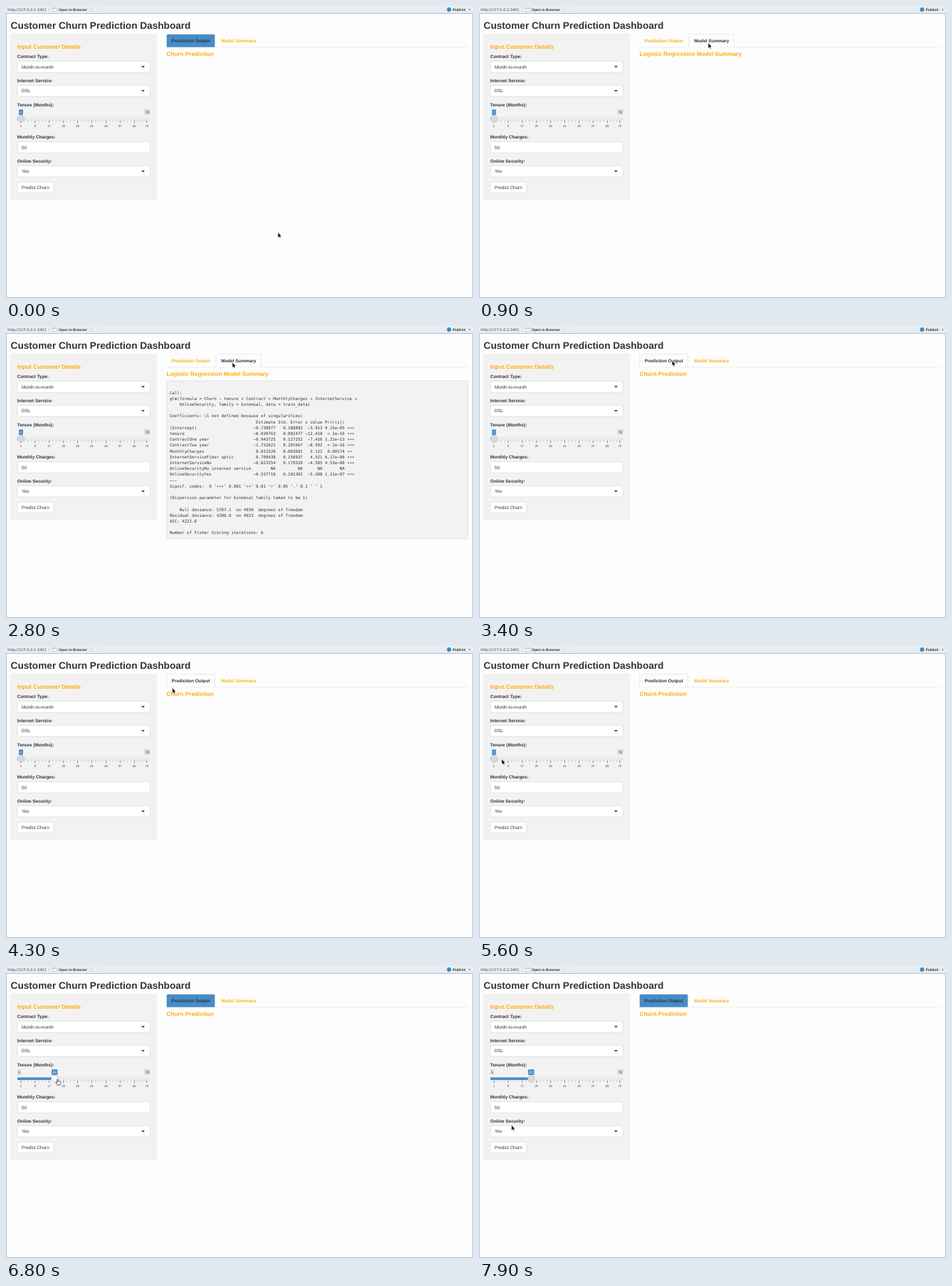
Animation of 656x410 px, one loop 8 s. Source, as an HTML page:

```html
<!DOCTYPE html>
<html lang="en">
<head>
<meta charset="utf-8">
<title>Customer Churn Prediction Dashboard</title>
<style>
html, body { margin: 0; width: 100%; height: 100%; overflow: hidden; background: #fdfdfd; }
svg { display: block; width: 100%; height: 100%; }
text { font-family: "Liberation Sans", Arial, sans-serif; font-size: 6.36px; fill: #333; white-space: pre; text-rendering: geometricPrecision; }
.b { font-weight: bold; }
.h { font-size: 8.17px; font-weight: bold; fill: #ffae08; }
.irs { font-size: 5px; text-anchor: middle; }
.grid { font-size: 4.1px; text-anchor: middle; }
.bar { font-size: 5px; font-weight: bold; }
.url { font: 5.09px "DejaVu Sans", sans-serif; fill: #444; }
.mono { font: 5.75px "DejaVu Sans Mono", monospace; }
</style>
</head>
<body>
<svg id="stage" viewBox="0 0 656 410"></svg>
<script>
const LOOP = 8000, STEP = 100;
const stage = document.getElementById('stage');
const BLUE = '#428bca', ORANGE = '#ffae08', DARK = '#333';

const rect = (x, y, w, h, fill, stroke = 'none', r = 0, more = '') =>
  `<rect x="${x}" y="${y}" width="${w}" height="${h}" rx="${r}" fill="${fill}" stroke="${stroke}" stroke-width=".5" ${more}/>`;
const esc = s => s.replace(/&/g, '&amp;').replace(/</g, '&lt;');
const text = (x, y, s, cls = '', more = '') =>
  `<text x="${x}" y="${y}" class="${cls}" ${more}>${esc(s)}</text>`;
const caret = (x, y, w = 5) =>
  `<path d="M${x - w / 2} ${y}h${w}l${-w / 2} ${w / 2}z" fill="#333"/>`;
const line = (x1, y1, x2, y2, color, w = .5) =>
  `<path d="M${x1} ${y1}L${x2} ${y2}" stroke="${color}" stroke-width="${w}"/>`;

const field = (y, label, value, select = true) =>
  text(15.8, y, label, 'b') +
  rect(16, y + 4.6, 186.5, 15.6, '#fff', '#ccc', 2) +
  text(21.9, y + 14.6, value) +
  (select ? caret(192.4, y + 11.2) : '');

// Tenure slider
const slideX = v => 21 + (v - 1) / 71 * 176.7;

function sliderGrid() {
  const stops = [1, 9, 17, 25, 33, 41, 49, 57, 65, 72];
  return stops.map((v, i) => {
    const x = slideX(v), next = slideX(stops[i + 1] || v);
    let s = line(x, 160.4, x, 164.2, '#222') + text(x, 169.8, String(v), 'grid');
    for (let k = 1; k < 4 && next > x; k++) {
      const m = x + (next - x) * k / 4;
      s += line(m, 160.4, m, 162.6, '#888', .45);
    }
    return s;
  }).join('');
}

// Console output of the model
const coef = [
  ['(Intercept)', '-0.738977', '0.188892', '-3.912', '9.15e-05', '***'],
  ['tenure', '-0.030763', '0.002477', '-12.418', '< 2e-16', '***'],
  ['ContractOne year', '-0.943725', '0.127252', '-7.416', '1.21e-13', '***'],
  ['ContractTwo year', '-1.732621', '0.201667', '-8.592', '< 2e-16', '***'],
  ['MonthlyCharges', '0.011526', '0.003681', '3.131', '0.00174', '**'],
  ['InternetServiceFiber optic', '0.709438', '0.156937', '4.521', '6.17e-06', '***'],
  ['InternetServiceNo', '-0.822254', '0.179320', '-4.585', '4.53e-06', '***'],
  ['OnlineSecurityNo internet service', 'NA', 'NA', 'NA', 'NA', ''],
  ['OnlineSecurityYes', '-0.537710', '0.101302', '-5.308', '1.11e-07', '***']
];
const row = ([name, est, se, z, p, sig]) =>
  name.padEnd(33) + est.padStart(10) + se.padStart(11) + z.padStart(8) + p.padStart(9) + ' ' + sig;
const report = [
  'Call:',
  'glm(formula = Churn ~ tenure + Contract + MonthlyCharges + InternetService + ',
  '    OnlineSecurity, family = binomial, data = train_data)',
  '',
  'Coefficients: (1 not defined because of singularities)',
  row(['', 'Estimate', 'Std. Error', 'z value', 'Pr(>|z|)', '']),
  ...coef.map(row),
  '---',
  'Signif. codes:  0 ‘***’ 0.001 ‘**’ 0.01 ‘*’ 0.05 ‘.’ 0.1 ‘ ’ 1',
  '',
  '(Dispersion parameter for binomial family taken to be 1)',
  '',
  '    Null deviance: 5707.1  on 4930  degrees of freedom',
  'Residual deviance: 4206.8  on 4923  degrees of freedom',
  'AIC: 4222.8',
  '',
  'Number of Fisher Scoring iterations: 6'
];
const reportText = report.map((s, i) =>
  text(229.9, 95.5 + i * 8.2, s.replace(/-/g, '−').replace(/\*/g, '∗'), 'mono')).join('');

const tab = (id, x, w, label) =>
  `<g id="${id}"><path d="M${x} 57.8V41.5q0-1.8 1.8-1.8h${w - 3.6}q1.8 0 1.8 1.8V57.8" stroke-width=".5"/>` +
  text(x + 7.2, 51, label, 'b') + '</g>';

const toolbar =
  rect(0, 0, 656, 10.4, '#e8edf1') +
  text(2.2, 6.7, 'http://127.0.0.1:3401', 'url') +
  line(61, 1.5, 61, 9, '#d0d5da') +
  rect(66, 2.6, 5.6, 5, '#fff', '#9aa5b0', .6) + rect(66, 2.6, 5.6, 1.2, '#b4c0cc') +
  text(74, 6.8, 'Open in Browser', 'bar') +
  line(118, 1.5, 118, 9, '#d0d5da') +
  rect(122.6, 2.6, 5.2, 5, '#f3f5f7', '#c6ccd2', .6) +
  '<circle cx="622.4" cy="5.1" r="3" fill="#3b87c8"/>' +
  text(627.4, 6.8, 'Publish', 'bar') + caret(651.2, 4.6, 2.6);

stage.innerHTML =
  rect(0, 0, 656, 410, '#fdfdfd') + toolbar +
  rect(.4, 10.6, 655.2, 398.8, 'none', '#9db5d3', 0, 'style="stroke-width:.8"') +
  text(6.6, 31.6, 'Customer Churn Prediction Dashboard', 'b', 'style="font-size:13.63px"') +
  rect(6.7, 39.7, 204.7, 231.6, '#f2f2f2', '#dedede', 2) +
  text(15.8, 60.3, 'Input Customer Details', 'h') +
  field(73.1, 'Contract Type:', 'Month-to-month') +
  field(106.8, 'Internet Service:', 'DSL') +
  text(15.8, 140.5, 'Tenure (Months):', 'b') +
  field(186, 'Monthly Charges:', '50', false) +
  field(219.7, 'Online Security:', 'Yes') +
  rect(16, 247.2, 50.8, 15.2, '#fff', '#ccc', 2) + text(21.9, 256.9, 'Predict Churn') +
  rect(16, 156.5, 186.5, 3.6, '#ededed', '#dcdcdc', 1.6) + sliderGrid() +
  rect(16, 156.5, 5, 3.6, BLUE, 'none', 1, 'id="fill"') +
  `<g id="low">${rect(15.9, 145.2, 5.4, 7.4, '#dcdcdc', 'none', 1.2)}${text(18.6, 150.8, '1', 'irs')}</g>` +
  rect(194.3, 145.2, 8.3, 7.4, '#dcdcdc', 'none', 1.2) + text(198.45, 150.8, '72', 'irs') +
  rect(0, 145.2, 6, 7.8, BLUE, 'none', 1.2, 'id="tag"') +
  text(0, 150.8, '1', 'irs', 'id="value" style="fill:#fff"') +
  '<circle id="knob" cy="158.2" r="4.8" stroke="#ababab" stroke-width=".5"/>' +
  line(225.5, 57.8, 649, 57.8, '#ddd') +
  tab('tabA', 225.6, 67.8, 'Prediction Output') + tab('tabB', 295, 63.2, 'Model Summary') +
  text(225.5, 70.3, '', 'h', 'id="head"') +
  `<g id="report">${rect(225.7, 76.9, 423.2, 222, '#f2f2f2', '#ccc', 2)}${reportText}</g>` +
  '<path id="arrow" d="M0 0V7.2L1.7 5.7L2.8 8.2L4 7.7L2.9 5.2H5.1Z" fill="#000" stroke="#fff" stroke-width=".5"/>' +
  '<path id="hand" d="M-1.6 -3.6q.8-1 1.5 0V-1q.7-.6 1.3 .1q.7-.5 1.2 .2q.9-.4 1.1 .6V1.8L2.6 4.2H-1.2L-3.2 1.2q-.2-1 .7-.8L-1.6 1.1Z" fill="#fff" stroke="#000" stroke-width=".6"/>';

const el = {};
stage.querySelectorAll('[id]').forEach(n => el[n.id] = n);
const set = (n, o) => { for (const k in o) n.setAttribute(k, o[k]); };
const show = (n, on) => set(n, { visibility: on ? 'visible' : 'hidden' });

// Pointer track: time, x, y
const track = [
  [0, 382, 318], [100, 362, 268], [200, 306, 132], [300, 273.5, 65], [400, 273.5, 65],
  [600, 290, 58], [800, 319, 52.5], [900, 322, 52], [2700, 322, 52],
  [2800, 318, 51.3], [3000, 299, 50], [3300, 273, 48.8], [3500, 269.5, 48.6], [4000, 269.5, 48.6],
  [4300, 233.7, 59], [4600, 198, 80], [4900, 182.8, 89], [5000, 182.8, 89],
  [5200, 148, 103], [5400, 78, 139], [5600, 32, 159], [5900, 22, 158.5], [7200, 22, 158.5],
  [7300, 75, 160], [7600, 75, 160], [7800, 53, 206], [7900, 45.7, 223.5], [8000, 45.7, 223.5]
];
function pointer(t) {
  const i = track.findIndex(k => k[0] > t);
  const [t0, x0, y0] = track[i - 1], [t1, x1, y1] = track[i];
  const p = (t - t0) / (t1 - t0);
  return [x0 + (x1 - x0) * p, y0 + (y1 - y0) * p];
}

function tenure(t) {
  const p = Math.min(1, Math.max(0, (t - 6100) / 900));
  return Math.round(1 + 21 * Math.sin(p * Math.PI / 2) ** 1.5);
}

function paintTab(g, active, focus) {
  const [shape, label] = g.children;
  set(shape, {
    fill: !active ? 'none' : focus ? '#fdfdfd' : '#468bc7',
    stroke: active ? '#d4d4d4' : 'none'
  });
  label.style.fill = active ? DARK : ORANGE;
}

function draw(now) {
  const t = Math.floor(now % LOOP / STEP) * STEP;
  const summary = t >= 800 && t < 3400;
  paintTab(el.tabA, !summary, t >= 3400 && t < 6000);
  paintTab(el.tabB, summary, true);
  el.head.textContent = summary ? 'Logistic Regression Model Summary' : 'Churn Prediction';
  show(el.report, summary && t >= 1000);

  const v = tenure(t), x = slideX(v), w = v > 9 ? 8.4 : 5.6;
  set(el.fill, { width: x - 16 });
  set(el.tag, { x: x - w / 2, width: w });
  set(el.value, { x });
  el.value.textContent = v;
  set(el.knob, { cx: x, fill: t >= 5800 && t < 7700 ? '#fafafa' : '#dadada' });
  show(el.low, x - w / 2 > 21.5);

  const drag = t >= 6000 && t < 7300;
  const [px, py] = drag ? [x + 5, 163] : pointer(t);
  show(el.hand, drag);
  show(el.arrow, !drag);
  set(drag ? el.hand : el.arrow, { transform: `translate(${px} ${py})` });
}

const start = performance.now();
function tick() {
  draw(performance.now() - start);
  requestAnimationFrame(tick);
}
tick();
</script>
</body>
</html>
```
